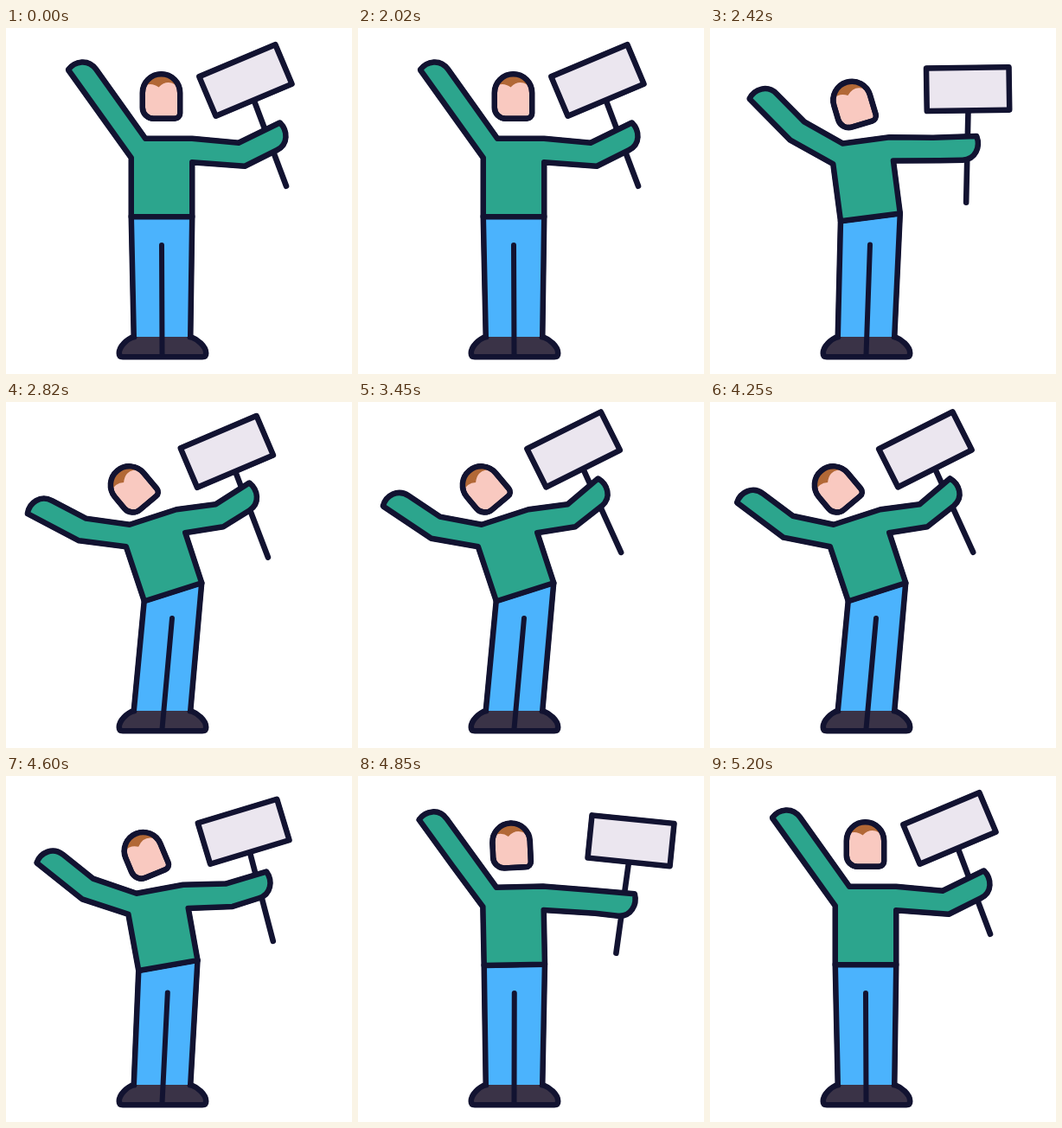
An HTML page with a canvas for the animation above (5220 ms loop, 400 by 400 pixels).

```html
<!DOCTYPE html>
<html>
<head>
<meta charset="utf-8">
<style>
  html, body { margin: 0; width: 100%; height: 100%; overflow: hidden; background: #fff; }
  canvas { display: block; width: 400px; height: 400px; }
</style>
</head>
<body>
<canvas id="stage"></canvas>
<script>
const LOOP = 5220;
const INK = '#121331', GREEN = '#2ca58d', BLUE = '#4bb3fd', SHOE = '#3a3347',
      SKIN = '#f9c9c0', HAIR = '#b26836', PAPER = '#ebe6ef';

const canvas = document.getElementById('stage');
const ctx = canvas.getContext('2d');
const dpr = window.devicePixelRatio || 1;
canvas.width = canvas.height = 400 * dpr;

const mix = (a, b, u) => a + (b - a) * u;
const smooth = (t, a, b) => {
  const p = Math.min(1, Math.max(0, (t - a) / (b - a)));
  return p * p * (3 - 2 * p);
};

// Smooth curve through [time, value] keys, flat at peaks and at both ends
function curve(keys) {
  const slope = keys.map(([t, v], i) => {
    const a = keys[i - 1], b = keys[i + 1];
    if (!a || !b || (v - a[1]) * (b[1] - v) <= 0) return 0;
    return (b[1] - a[1]) / (b[0] - a[0]);
  });
  return t => {
    if (t <= keys[0][0]) return keys[0][1];
    const i = keys.findIndex(k => k[0] > t);
    if (i < 0) return keys[keys.length - 1][1];
    const [t0, v0] = keys[i - 1], [t1, v1] = keys[i];
    const d = t1 - t0, p = (t - t0) / d, q = 1 - p;
    return v0 * q * q * (1 + 2 * p) + v1 * p * p * (3 - 2 * p)
         + d * p * q * (slope[i - 1] * q - slope[i] * p);
  };
}

// Alternating swing between two values, half a period per key
const swing = (start, count, first, second) =>
  Array.from({ length: count }, (_, i) => [start + i * 192.5, i % 2 ? second : first]);

const leftUpper = curve([[2020, 54.4], [2520, 22], [2820, 7.3],
  ...swing(2950, 8, 6, 12), [4450, 6.5], [4600, 18], [4750, 46], [4910, 54.4]]);
const leftFore = curve([[2020, 54.4], [2520, 42], [2820, 27.7],
  ...swing(2950, 8, 24, 39), [4450, 24], [4600, 38.5], [4750, 51], [4910, 54.4]]);
const rightFore = curve([[2020, 26], [2300, -5], [2550, 14], [2820, 32.5],
  ...swing(3090, 8, 40.5, 35), [4600, 16.7], [4870, -5], [5200, 26]]);
const signTilt = curve([[2020, 22.8], [2300, -6], [2550, 12], [2820, 23],
  ...swing(3090, 8, 26.7, 23.6), [4600, 16.9], [4870, -6], [5200, 22.8]]);

const rad = Math.PI / 180;

// Point in a limb's frame: x along it, y across it; side is -1 left, 1 right
function along([px, py], side, deg, x, y) {
  const c = Math.cos(deg * rad), s = Math.sin(deg * rad);
  return [px + x * side * c + y * s, py - x * s + y * side * c];
}

function stroke(path, width) {
  ctx.lineWidth = width;
  ctx.stroke(path);
}

// Outlines are slightly heavier on the outside than on the inside
function paint(path, fill) {
  stroke(path, 7);
  ctx.fillStyle = fill;
  ctx.fill(path);
  stroke(path, 6);
}

function placed(x, y, deg, draw) {
  ctx.save();
  ctx.translate(x, y);
  ctx.rotate(-deg * rad);
  draw();
  ctx.restore();
}

const shoes = new Path2D('M148 357C140 360 131 368 131 376Q131 380 135 380H227Q231 380 231 376C231 368 221 360 213 357');
const skull = new Path2D('M-21.5 -4.5A21.5 21.5 0 0 1 21.5 -4.5V19A6 6 0 0 1 15.5 25H-9A12.5 12.5 0 0 1 -21.5 12.5Z');
const hair = new Path2D('M-24 -11Q-12 -18 -3 -11Q6 -20 16 -14L24 -12V-34H-24Z');
const board = new Path2D('M-47.5 -24.5H47.5V24.5H-47.5Z');
const pole = new Path2D('M0 25L-4 131');

function draw(t) {
  const u = smooth(t, 2120, 2800) - smooth(t, 4310, 4950);
  const pt = (x0, y0, x1, y1) => [mix(x0, x1, u), mix(y0, y1, u)];

  ctx.setTransform(dpr, 0, 0, dpr, 0, 0);
  ctx.fillStyle = '#fff';
  ctx.fillRect(0, 0, 400, 400);
  ctx.strokeStyle = INK;
  ctx.lineCap = ctx.lineJoin = 'round';

  // Legs and shoes
  const waistL = pt(145, 218, 160, 230), waistR = pt(215, 218, 226, 209);
  const legs = new Path2D();
  legs.moveTo(148, 357);
  legs.lineTo(...waistL);
  legs.lineTo(...waistR);
  legs.lineTo(213, 357);
  paint(shoes, SHOE);
  paint(legs, BLUE);
  const seam = new Path2D();
  seam.moveTo(...pt(180, 251, 192, 250));
  seam.lineTo(180.5, 378);
  stroke(seam, 6);

  // Joints
  const pitL = pt(145, 150, 139, 167), pitR = pt(215, 155, 207, 151);
  const a1 = leftUpper(t), a2 = leftFore(t), b = rightFore(t), tilt = signTilt(t);
  const elbowL = along(pitL, -1, a1, 58 - 3 * u, 0);
  const elbowTopL = along(elbowL, -1, (a1 + a2) / 2, 0, 26 / Math.cos((a2 - a1) / 2 * rad));
  const elbowTopR = pt(269, 133, 242.5, 118.5), elbowR = pt(276, 159.5, 251, 144);
  const reach = 53 - 7 * u;
  const handL = (x, y) => along(elbowL, -1, a2, x, y);
  const handR = (x, y) => along(elbowTopR, 1, b, x, y);

  // Sign, held behind the right hand
  const mid = [(elbowTopR[0] + elbowR[0]) / 2, (elbowTopR[1] + elbowR[1]) / 2];
  const grip = along(mid, 1, b, reach * 0.8, 0);
  placed(...grip, tilt, () => {
    ctx.translate(-5 + 5.5 * u, -75 + 16.5 * u);
    stroke(pole, 6.6);
    paint(board, PAPER);
  });

  // Sweater with both arms
  const body = new Path2D();
  const line = (...pts) => pts.forEach(p => body.lineTo(...p));
  body.moveTo(...waistL);
  line(pitL, elbowL, handL(67, 0));
  body.bezierCurveTo(...handL(71, 12), ...handL(64, 26), ...handL(49, 26));
  line(elbowTopL, pt(161, 128, 143, 142), pt(215, 128, 197, 124.5), elbowTopR, handR(reach, 0));
  body.bezierCurveTo(...handR(reach + 4, 12), ...handR(reach - 2, 26.5), ...handR(reach - 17, 26.5));
  line(elbowR, pitR, waistR);
  body.closePath();
  paint(body, GREEN);

  // Head
  placed(...pt(179.5, 79.5, 145.5, 99.5), 40 * u, () => {
    paint(skull, SKIN);
    ctx.save();
    ctx.clip(skull);
    ctx.fillStyle = HAIR;
    ctx.fill(hair);
    ctx.restore();
    stroke(skull, 6);
  });
}

const begin = performance.now();
function tick() {
  draw((performance.now() - begin) % LOOP);
  requestAnimationFrame(tick);
}
tick();
</script>
</body>
</html>
```
